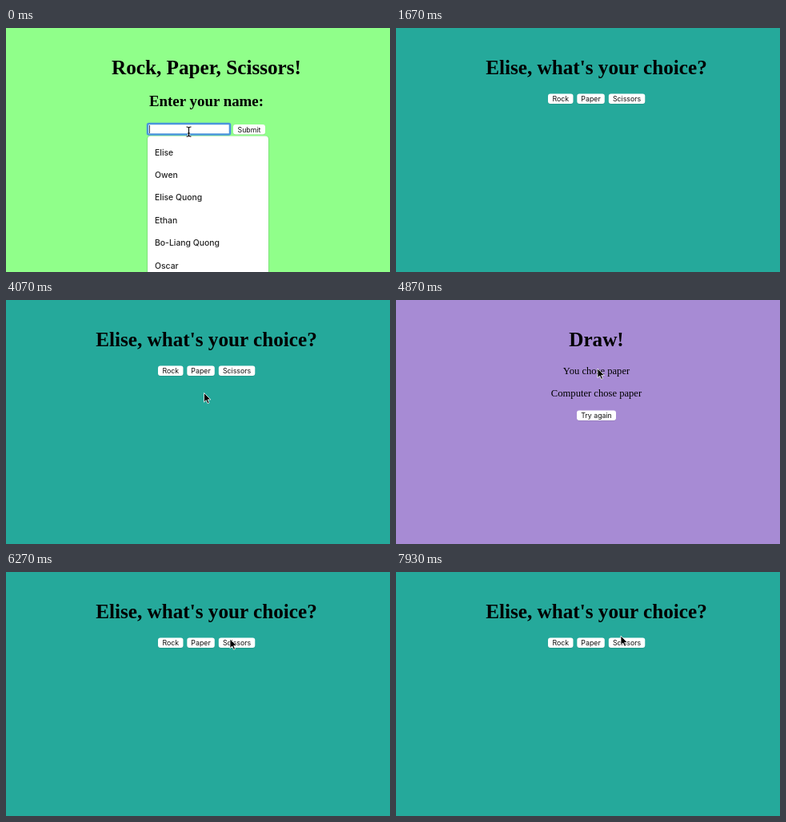
These frames come from a looping animation (480 by 306 pixels, 8 s). An HTML page:

```html
<!DOCTYPE html>
<html lang="en">
<head>
<meta charset="utf-8">
<title>Rock, Paper, Scissors!</title>
<style>
  html, body { margin: 0; width: 100%; height: 100%; overflow: hidden; }
  svg { display: block; width: 480px; height: 306px; }
  text { font-family: "Liberation Serif", Times, serif; font-size: 12.6px; text-anchor: middle; }
  .h1 { font-size: 25.2px; font-weight: bold; }
  .h2 { font-size: 18.9px; font-weight: bold; }
  .ui { font-family: Inter, sans-serif; font-size: 8.8px; fill: #111; }
  .left { text-anchor: start; }
  .item { font-size: 10.4px; font-weight: 500; fill: #222; }
</style>
</head>
<body>
<svg id="stage" viewBox="0 0 480 306"></svg>
<script>
const LOOP = 8000, TICK = 1000 / 15, MID = 250.5;
const stage = document.getElementById("stage");

function add(parent, tag, attrs = {}, content = "") {
  const node = document.createElementNS("http://www.w3.org/2000/svg", tag);
  for (const key in attrs) node.setAttribute(key, attrs[key]);
  node.textContent = content;
  return parent.appendChild(node);
}
const label = (parent, content, y, cls = "", x = MID) =>
  add(parent, "text", { x, y, class: cls }, content);
const box = (parent, x, y, width, height, rx, fill, extra = {}) =>
  add(parent, "rect", { x, y, width, height, rx, fill, ...extra });
const show = (node, on) => node.setAttribute("visibility", on ? "visible" : "hidden");

function makePage(color) {
  const page = add(stage, "g");
  box(page, 0, 0, 480, 306, 0, color);
  return page;
}
function button(page, content, x, y, width) {
  box(page, x, y + 0.5, width, 12.6, 3, "#000", { opacity: 0.18 });
  const face = box(page, x, y, width, 12.6, 3, "#fff");
  label(page, content, y + 9.8, "ui", x + width / 2);
  return face;
}
function makeResult(color, titles, player, computer) {
  const page = makePage(color);
  titles.forEach((title, i) => label(page, title, 58 + 46 * i, "h1"));
  const y = 46 * (titles.length - 1);
  label(page, "You chose " + player, 92.5 + y);
  label(page, "Computer chose " + computer, 121 + y);
  button(page, "Try again", 226, 138.5 + y, 49);
  return page;
}

// Name form with its suggestion list
const form = makePage("#90ff8a");
label(form, "Rock, Paper, Scissors!", 58, "h1");
label(form, "Enter your name:", 98, "h2");
button(form, "Submit", 284, 121, 40);
box(form, 177, 120, 103, 13.5, 1.5, "#fff", { stroke: "#4b95dc", "stroke-width": 2.6 });
const typedText = label(form, "", 130.5, "ui left", 180);
const caret = box(form, 179, 122, 0.8, 10, 0, "#222");
const list = add(form, "g");
const listShadow = box(list, 176.3, 135.5, 152.4, 0, 4, "#000", { opacity: 0.16 });
const listPanel = box(list, 177, 135.5, 151, 0, 4, "#fff");
const listItems = add(list, "g");
const names = ["Elise", "Owen", "Elise Quong", "Ethan", "Bo-Liang Quong", "Oscar",
  "Elise Q", "Eliana", "Ella"];

// Choice page
const choice = makePage("#25a99b");
label(choice, "Elise, what's your choice?", 58, "h1");
const faces = {
  rock: button(choice, "Rock", 190, 82.5, 31.5),
  paper: button(choice, "Paper", 226.3, 82.5, 34.5),
  scissors: button(choice, "Scissors", 265.8, 82.5, 45.5)
};

const drawRock = makeResult("#a78bd4", ["Draw!"], "rock", "rock");
const drawPaper = makeResult("#a78bd4", ["Draw!"], "paper", "paper");
const won = makeResult("#f7a2b6", ["Congratulations!", "You won!"], "scissors", "paper");
const pages = [form, choice, drawRock, drawPaper, won];

const arrow = add(stage, "path", {
  d: "M0 0V11.6L2.7 9.1L4.6 13.3L6.5 12.4L4.7 8.4H8.3Z",
  fill: "#000", stroke: "#fff", "stroke-width": 0.8
});
const beam = add(stage, "g");
const beamPath = "M-3 -6Q0 -6 0 -4.5Q0 -6 3 -6M0 -4.5V4.5M-3 6Q0 6 0 4.5Q0 6 3 6M-1.6 2H1.6";
for (const [stroke, width] of [["#fff", 2.2], ["#000", 1.1]])
  add(beam, "path", { d: beamPath, fill: "none", stroke, "stroke-width": width });

// Timelines: [start, value]
const pageTimes = [[0, form], [1660, choice], [2995, drawRock], [4060, choice],
  [4860, drawPaper], [5930, choice], [6660, won], [7660, choice]];
const typing = [[0, ""], [660, "E"], [860, "El"], [1060, "Eli"], [1260, "Elise"]];
const filters = [[0, ""], [730, "E"], [930, "El"], [1130, "Eli"], [1460, null]];
const cursors = [[0, "beam"], [260, "none"], [1930, "arrow"], [6660, "beam"], [6790, "arrow"]];
const presses = [[0, ""], [2660, "rock"], [2725, ""], [4530, "paper"], [4660, ""],
  [6330, "scissors"], [6395, ""]];
const path = [
  [0, 228.5, 130], [1930, 221, 123], [2200, 177, 70], [2400, 192, 33], [2730, 207.5, 87],
  [3000, 207.5, 87], [3800, 245, 143], [4059, 245, 143], [4060, 247.5, 116.5],
  [4530, 252, 86], [4870, 252, 86], [5330, 250, 128], [5470, 250, 128],
  [5667, 255, 144], [5733, 255, 144], [5867, 267.5, 116.5], [6267, 280, 84],
  [6659, 280, 84], [6660, 286, 97], [6670, 286, 97], [7133, 250, 186],
  [7270, 250, 186], [7400, 250, 188], [7533, 251, 186], [7933, 281, 80], [LOOP, 281, 80]
];

const at = (track, t) => track.findLast(([start]) => start <= t)[1];

function position(t) {
  const i = path.findLastIndex(([start]) => start <= t);
  const [t0, x0, y0] = path[i], [t1, x1, y1] = path[i + 1];
  const k = (t - t0) / (t1 - t0), ease = k * k * (3 - 2 * k);
  return [x0 + (x1 - x0) * ease, y0 + (y1 - y0) * ease];
}

let shownFilter;
function updateForm(t) {
  typedText.textContent = at(typing, t);
  caret.setAttribute("x", 179 + typedText.getComputedTextLength());
  const filter = at(filters, t);
  list.setAttribute("display", filter === null ? "none" : "inline");
  if (filter === null || filter === shownFilter) return;
  shownFilter = filter;
  const matches = names.filter(name => name.startsWith(filter));
  listItems.replaceChildren();
  matches.forEach((name, i) => label(listItems, name, 159.6 + 28.4 * i, "ui left item", 186));
  const height = 13 + 28.4 * matches.length;
  listPanel.setAttribute("height", height);
  listShadow.setAttribute("height", height + 1);
}

function frame() {
  // Motion advances at 15 steps per second, rounded to the nearest hundredth
  const now = performance.now() % LOOP;
  const t = Math.min(Math.floor(now / TICK + 0.08) * TICK, LOOP - TICK);
  const current = at(pageTimes, t);
  for (const page of pages) show(page, page === current);
  // The list keeps its own display state, so it only needs work while visible
  if (current === form) updateForm(t);

  const pressed = at(presses, t);
  for (const name in faces) faces[name].setAttribute("fill", name === pressed ? "#eee" : "#fff");

  const cursor = at(cursors, t), [x, y] = position(t);
  for (const [node, name] of [[arrow, "arrow"], [beam, "beam"]]) {
    show(node, name === cursor);
    node.setAttribute("transform", `translate(${x} ${y})`);
  }
  requestAnimationFrame(frame);
}
frame();
</script>
</body>
</html>
```
